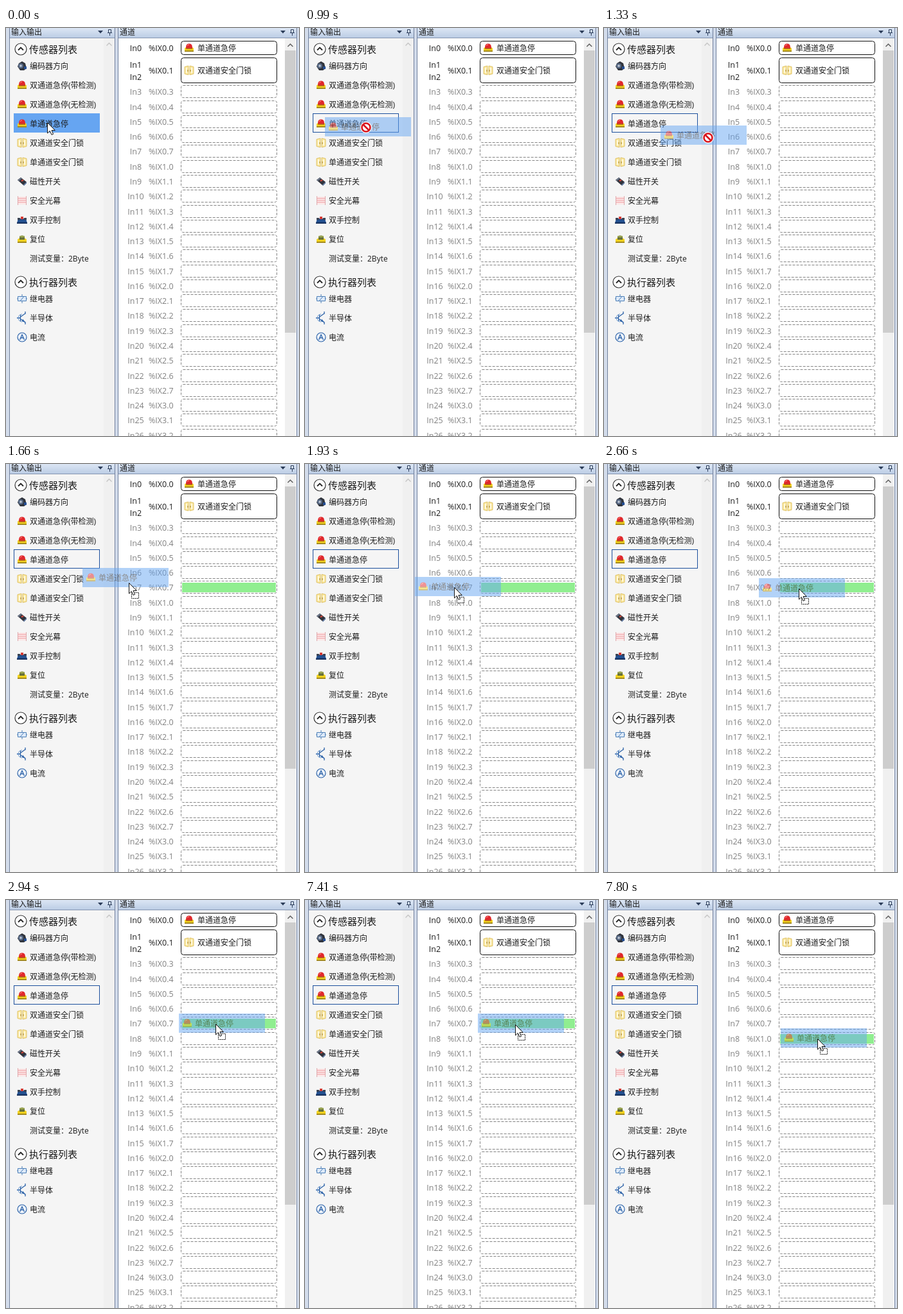
An HTML page that plays this animation: 456x636 px, repeating every 8 s.

```html
<!DOCTYPE html>
<html lang="zh-CN">
<head>
<meta charset="utf-8">
<title>拖放输入通道</title>
<style>
html, body { margin: 0; width: 100%; height: 100%; overflow: hidden; background: #fff; }
#stage { position: relative; width: 456px; height: 636px; overflow: hidden; }
svg { display: block; position: absolute; left: 0; top: 0; overflow: visible; }
text { font: 12px "Open Sans", "Noto Sans CJK SC", "Noto Sans CJK", sans-serif; fill: #1c1c1c; }
.title { font-size: 15px; }
.io { font-size: 12.5px; }
.dim { fill: #808080; }
.mid { text-anchor: middle; }

#ghost, #cursor { position: absolute; }
#ghost { width: 134px; height: 30px; opacity: .5; background: #66a5f1; }
#ghost, #cursor, .timed { animation: 8s step-end infinite; }
#ghost { animation-name: drag; }
#cursor { animation-name: point; }
#pressed { animation-name: pressed; }
#picked { animation-name: picked; }
#row7 { animation-name: row7; }
#row8 { animation-name: row8; }
#arrow { animation-name: arrow; }
#deny { animation-name: deny; }
#drop { animation-name: drop; }

/* the pointer is polled about 15 times a second, so motion is stepped */
@keyframes drag {
  0%      { left: 12px; top: 133px; visibility: hidden; }
  10%     { left: 12px; top: 134px; visibility: visible; animation-timing-function: steps(8); }
  16.625% { left: 88px; top: 152px; visibility: visible; animation-timing-function: steps(3); }
  19.125% { left: 109px; top: 159px; animation-timing-function: steps(6); }
  24.125% { left: 171px; top: 176px; animation-timing-function: steps(7); }
  29.875% { left: 224px; top: 179px; animation-timing-function: steps(8); }
  36.75%  { left: 269px; top: 177px; }
  92.625% { left: 269px; top: 177px; animation-timing-function: steps(6); }
  97.5%, 100% { left: 275px; top: 200px; visibility: visible; }
}
@keyframes point {
  0%      { left: 64px; top: 147px; }
  9.125%  { left: 66px; top: 148px; }
  10%     { left: 72px; top: 150px; animation-timing-function: steps(8); }
  16.625% { left: 162px; top: 171px; animation-timing-function: steps(3); }
  19.125% { left: 183px; top: 184px; animation-timing-function: steps(6); }
  24.125% { left: 232px; top: 192px; animation-timing-function: steps(7); }
  29.875% { left: 289px; top: 195px; animation-timing-function: steps(8); }
  36.75%  { left: 326px; top: 193px; }
  92.625% { left: 327px; top: 194px; animation-timing-function: steps(6); }
  97.5%, 100% { left: 332px; top: 216px; }
}
@keyframes pressed { 0% { opacity: 1; } 10%, 100% { opacity: 0; } }
@keyframes picked  { 0% { opacity: 0; } 10%, 100% { opacity: 1; } }
@keyframes row7 {
  0% { opacity: 0; } 19.875% { opacity: 1; } 29.875% { opacity: 0; }
  30.625% { opacity: 1; } 95.06%, 100% { opacity: 0; }
}
@keyframes row8  { 0% { opacity: 0; } 95.85%, 100% { opacity: 1; } }
@keyframes arrow { 0% { opacity: 1; } 10% { opacity: 0; } 18.25%, 100% { opacity: 1; } }
@keyframes deny  { 0% { opacity: 0; } 10% { opacity: 1; } 18.25%, 100% { opacity: 0; } }
@keyframes drop  { 0% { opacity: 0; } 18.25%, 100% { opacity: 1; } }
</style>
</head>
<body>
<div id="stage">
  <svg width="456" height="636">
    <defs>
      <linearGradient id="bar" x2="0" y2="1">
        <stop stop-color="#dce6f4"/><stop offset="1" stop-color="#bccde5"/>
      </linearGradient>
      <symbol id="stop" viewBox="0 0 16 16" overflow="visible">
        <path d="M1 8.5 3 7h10l2 1.500V14H1z" fill="#f2d21f"/>
        <path d="M1 12h14v2H1z" fill="#a48a1c"/>
        <path d="M3 8.500C3 4 4 1.500 8 1.500s5 2.500 5 7z" fill="#e0282c"/>
        <path d="M5 5Q5.500 3 8 3" stroke="#ff8d85" fill="none"/>
        <path d="M3 9h10" stroke="#8c2218"/>
      </symbol>
      <symbol id="encoder" viewBox="0 0 16 16">
        <path d="M3 4 8 1l5 3 2 8-4 3H5L1 9z" fill="#30343c"/>
        <circle cx="6" cy="8" r="4" fill="#586a86"/><circle cx="6" cy="8" r="1.700" fill="#c4ccd8"/>
        <path d="M11 9h4v4h-4z" fill="#254f95"/>
      </symbol>
      <symbol id="lock" viewBox="0 0 16 16">
        <path d="M1 2.500 7 1v14l-6-1.500zM9 1l6 1.500v11L9 15z" fill="#fbe9a4" stroke="#d8b64c" stroke-width=".8"/>
        <path d="M4 4v8M12 4v8" stroke="#fff8dc" stroke-width="2"/>
        <path d="M6 7v3M10 7v3" stroke="#a5802a"/>
      </symbol>
      <symbol id="magnet" viewBox="0 0 16 16">
        <path d="M1 6 6 2l9 7-5 5z" fill="#31343d"/>
        <path d="M1 6 6 2l2 1.500-5 4z" fill="#6c7688"/>
        <path d="m6 7 3-2 2 1.500-3 2z" fill="#c9483c"/><path d="m10 14 5-5v2l-4 4z" fill="#4d6a99"/>
      </symbol>
      <symbol id="curtain" viewBox="0 0 16 16">
        <path d="M1 2h14v12H1z" fill="#fbe4e4"/>
        <path d="M2 4.500h12M2 7.500h12M2 10.500h12" stroke="#f0a4a8"/>
        <path d="M1.500 1v14M14.500 1v14" stroke="#dfa9ac"/>
      </symbol>
      <symbol id="hands" viewBox="0 0 16 16">
        <path d="M2 6h12l2 7H0z" fill="#23508f"/><path d="M0 12h16v2H0z" fill="#152f5c"/>
        <path d="M6 3h4v4H6z" fill="#d43a32"/><path d="M1 5h4v3H1zM11 5h4v3h-4z" fill="#3a4250"/>
      </symbol>
      <symbol id="reset" viewBox="0 0 16 16">
        <path d="M1 8.500 3 7h10l2 1.500V14H1z" fill="#f2d21f"/><path d="M1 12h14v2H1z" fill="#a48a1c"/>
        <path d="M4 9V4q4-3 8 0v5z" fill="#66703a"/><ellipse cx="8" cy="4" rx="4" ry="1.500" fill="#9aa552"/>
      </symbol>
      <symbol id="relay" viewBox="0 0 16 16" overflow="visible">
        <path d="M8 1v14M0 8h16" stroke="#4d7fb8"/>
        <path d="M1.500 4.500h13v7h-13z" fill="#dce9f8" stroke="#4d7fb8"/><path d="m5 11.500 6-7" stroke="#4d7fb8"/>
      </symbol>
      <symbol id="transistor" viewBox="0 0 16 16" overflow="visible">
        <path d="M0 8h5M5.500 3v10M6 6l7-5M6 10l7 5M13-2v4M13 14v4" stroke="#2c62a8" stroke-width="1.300" fill="none"/>
        <path d="m9 9.500 4 5-5-1z" fill="#2c62a8"/><path d="M8 2a6 6 0 0 0 0 12" fill="none" stroke="#6d9bd0"/>
      </symbol>
      <symbol id="current" viewBox="0 0 16 16" overflow="visible">
        <circle cx="8" cy="8" r="7" fill="#eef4fb" stroke="#2c62a8" stroke-width="1.200"/>
        <path d="m4.500 12 3.500-8 3.500 8M6 9h4" fill="none" stroke="#2c62a8" stroke-width="1.300"/>
      </symbol>
    </defs>
    <g id="scene"></g>
  </svg>

  <div id="ghost">
    <svg width="134" height="30">
      <use href="#stop" x="5" y="7" width="16" height="16"/>
      <text x="25" y="19.500">单通道急停</text>
    </svg>
  </div>

  <div id="cursor">
    <svg width="1" height="1">
      <g id="drop" class="timed">
        <rect x="4.500" y="15.500" width="11" height="9" fill="#fff"/>
        <rect x="4.500" y="15.500" width="11" height="9" fill="none" stroke="#111" stroke-dasharray="2 1"/>
      </g>
      <path id="arrow" class="timed" d="M.5.500v16.500l3.800-3.600 2.700 6 2.600-1.100-2.600-5.800h5.300z" fill="#fff" stroke="#111"/>
      <g id="deny" class="timed" fill="none">
        <circle r="7" fill="#fff" stroke="#fff" stroke-width="4"/>
        <circle r="6.500" stroke="#d9141c" stroke-width="2.600"/>
        <path d="m-4.500-4.500 9 9" stroke="#d9141c" stroke-width="2.600"/>
      </g>
    </svg>
  </div>
</div>

<script>
const rect = (x, y, w, h, fill, more = '') =>
  `<rect x="${x}" y="${y}" width="${w}" height="${h}" fill="${fill}" ${more}/>`;
const text = (x, mid, s, cls = '') =>
  `<text x="${x}" y="${mid + (cls === 'title' ? 5.5 : 4.5)}" class="${cls}">${s}</text>`;
const icon = (id, x, mid) => `<use href="#${id}" x="${x}" y="${mid - 8}" width="16" height="16"/>`;
const line = (d, color, width = 1) =>
  `<path d="${d}" fill="none" stroke="${color}" stroke-width="${width}"/>`;

function header(x, w, name, caret) {
  const pin = caret + 15;
  return rect(x, 0, w, 15, 'url(#bar)') + rect(x, 15, w, 1, '#8595b0') +
    text(x + 2, 6, name) +
    `<path d="M${caret - 4} 4h8l-4 4.500z" fill="#2b3c59"/>` +
    line(`M${pin - 2.5} 2.500h4v5h-4zM${pin - 4} 7.500h7M${pin - .5} 8v4`, '#2b3c59');
}

function group(mid, name) {
  return `<circle cx="23" cy="${mid}" r="9" fill="#fff" stroke="#333" stroke-width="1.200"/>` +
    line(`M19 ${mid + 1.5}l4-4 4 4`, '#222', 1.8) + text(36, mid, name, 'title');
}

function channel(mid, label, addr, cls) {
  return text(202, mid, label, `io mid ${cls}`) + (addr ? text(222, mid, addr, `io ${cls}`) : '');
}

const sensors = [
  ['encoder', '编码器方向'], ['stop', '双通道急停(带检测)'], ['stop', '双通道急停(无检测)'],
  ['stop', '单通道急停'], ['lock', '双通道安全门锁'], ['lock', '单通道安全门锁'],
  ['magnet', '磁性开关'], ['curtain', '安全光幕'], ['hands', '双手控制'],
  ['reset', '复位'], ['', '测试变量：2Byte']
];
const outputs = [['relay', '继电器'], ['transistor', '半导体'], ['current', '电流']];
const list = (items, top) => items.map(([id, name], i) => {
  const mid = top + 30 * i;
  return (id ? icon(id, 17, mid) : '') + text(37, mid, name);
}).join('');

const rowMid = n => Math.round(99.4 + (n - 3) * 23.27);

// window frame and left panel
let out = rect(0, 0, 456, 636, '#d3dceb') +
  rect(6, 0, 163, 636, '#f5f5f5') + rect(152, 16, 17, 620, '#f0f0f0') +
  rect(175, 0, 277, 636, '#fff') +
  header(6, 163, '输入输出', 147) + header(175, 277, '通道', 431) +
  [5, 169, 174, 452].map(x => rect(x, 0, 1, 636, '#71809d')).join('') +
  line('M156.500 27.500l4-4 4 4', '#c3c3c3', 1.3);

out += rect(12, 133, 134, 30, '#66a5f1', 'id="pressed" class="timed"') +
  rect(12.5, 133.5, 133, 29, 'none', 'id="picked" class="timed" stroke="#1c4f9c"') +
  group(33, '传感器列表') + list(sensors, 59) +
  group(396, '执行器列表') + list(outputs, 422);

// right panel
out += rect(434, 16, 17, 620, '#f0f0f0') + rect(434, 35, 17, 440, '#cdcdcd') +
  line('M438.500 29l4-4 4 4', '#606060', 1.5);

const solid = 'rx="4" stroke="#111"';
out += channel(31, 'In0', '%IX0.0', '') + channel(57, 'In1', '', '') +
  channel(76, 'In2', '', '') + channel(66, '', '%IX0.1', '') +
  rect(272.5, 20.5, 149, 21, '#fff', solid) + icon('stop', 277, 31) + text(298, 31, '单通道急停') +
  rect(272.5, 46.5, 149, 39, '#fff', solid) + icon('lock', 277, 66) + text(298, 66, '双通道安全门锁');

for (let n = 3; n <= 26; n++) {
  const mid = rowMid(n);
  out += channel(mid + .5, 'In' + n, `%IX${n >> 3}.${n & 7}`, 'dim') +
    rect(272.5, mid - 9.5, 149, 19, '#fff', 'rx="3" stroke="#858585" stroke-dasharray="4 2"');
  if (n === 7 || n === 8) {
    out += rect(274, mid - 7, 146, 15, '#90ee90', `id="row${n}" class="timed"`);
  }
}
document.getElementById('scene').innerHTML = out;
</script>
</body>
</html>
```
